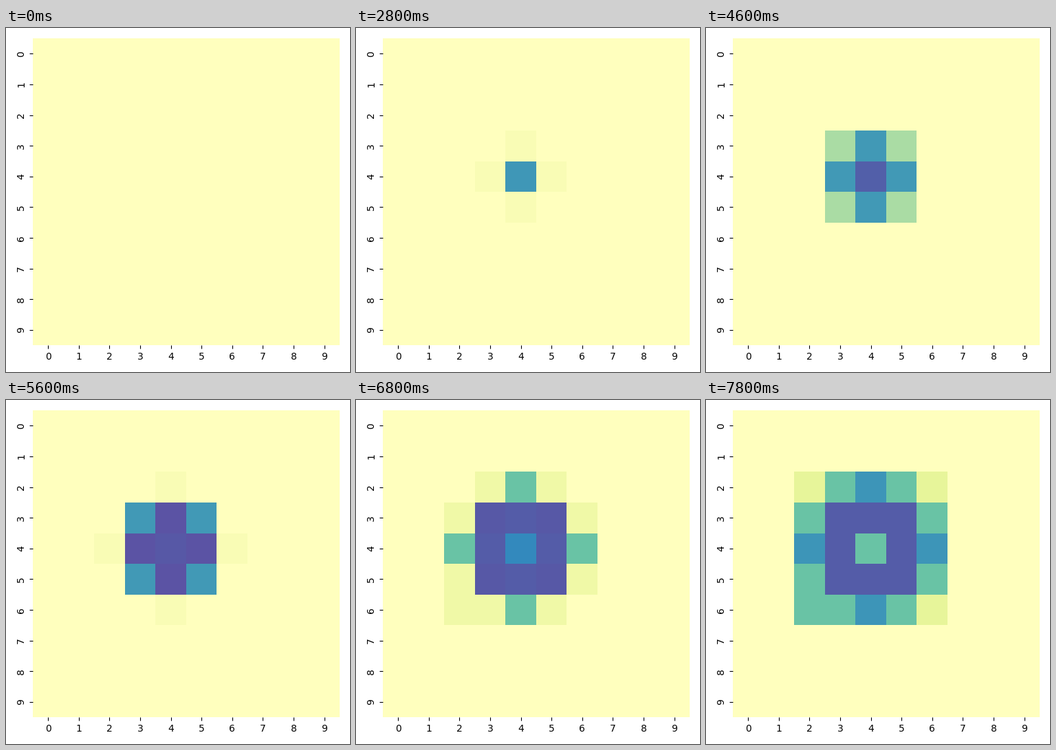
A matplotlib script for the animation above (8 s loop, 500 px wide and 500 px high).

```python
import matplotlib.pyplot as plt
import numpy as np
from matplotlib.animation import FuncAnimation

SIZE, DPI = 500, 100
CELLS, CENTER = 10, 4
FRAMES, INTERVAL = 40, 200
FIRST_STEP = 4
EARLY_CORNER = (6, 2)

# One life course shared by all cells: (age in steps, level).
COURSE = [(0, .05), (3, .26), (4, .40), (6, .59), (9, .74), (12, .76),
          (14, .98), (17, .925), (23, .975), (27, .925), (32, .70), (35, .59)]
AGES, LEVELS = zip(*COURSE)


def onset_grid():
    """Step at which growth reaches each cell, spreading from the center."""
    rows, cols = np.abs(np.indices((CELLS, CELLS)) - CENTER)
    ring, along = np.maximum(rows, cols), np.minimum(rows, cols)
    along[EARLY_CORNER] -= 1
    return FIRST_STEP + 8 * ring + 2 * ring**2 + (11 * along - along**2) // 2


ONSET = onset_grid()


def levels(step):
    return np.interp(step - ONSET, AGES, LEVELS, left=0)


plt.rcParams["font.family"] = "DejaVu Sans"
fig, ax = plt.subplots(figsize=(SIZE / DPI, SIZE / DPI), dpi=DPI)
mesh = ax.pcolormesh(levels(0), cmap="Spectral", vmin=-1, vmax=1)
ax.set_xlim(0, CELLS)
ax.set_ylim(CELLS, 0)
ax.spines[:].set_visible(False)
ticks = np.arange(CELLS) + 0.5
ax.set_xticks(ticks, range(CELLS))
ax.set_yticks(ticks, range(CELLS), rotation="vertical", va="center")
fig.tight_layout()


def update(step):
    mesh.set_array(levels(step))
    return (mesh,)


anim = FuncAnimation(fig, update, frames=FRAMES, interval=INTERVAL,
                     repeat=True, repeat_delay=0, blit=False)
plt.show()
```
